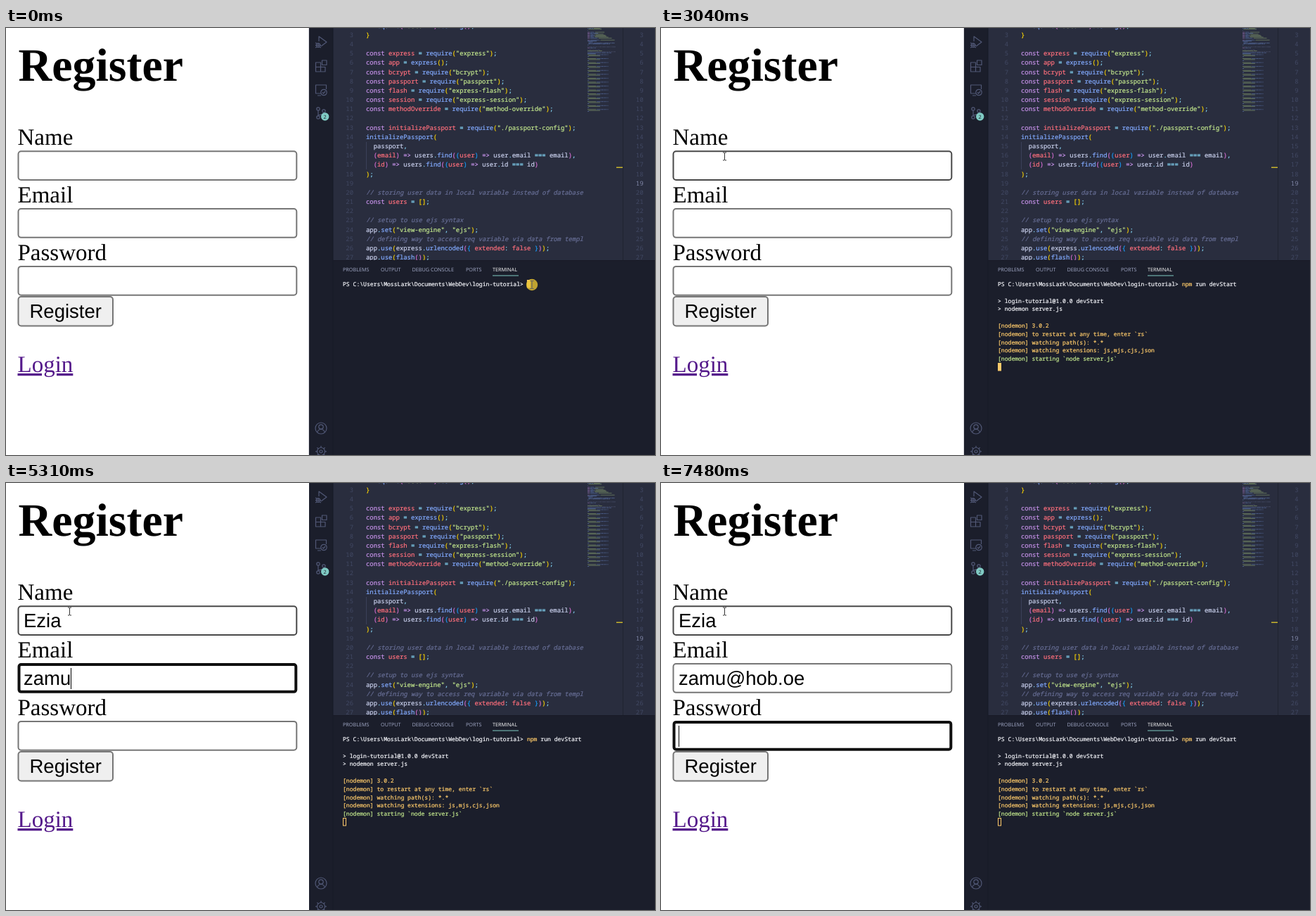
Write an HTML page that moves like this. It is 923 by 607 pixels and loops after 8 s.

```html
<!DOCTYPE html>
<html lang="en">
<head>
<meta charset="utf-8">
<title>Register form</title>
<style>
  html, body { margin: 0; width: 100%; height: 100%; overflow: hidden; background: #fff; }
  svg { display: block; width: 923px; height: 607px; }
  text { text-rendering: geometricPrecision; }
  tspan { stroke-width: .22px; }
  .serif { font: 33px "Liberation Serif", serif; }
  .link { fill: #551a8b; text-decoration: underline; }
  .title { font: bold 66px "Liberation Serif", serif; }
  .sans { font: 27.5px "Liberation Sans", sans-serif; }
  .code { font: 8.9px "Noto Sans Mono", monospace; }
  .term { font: 8.08px "Noto Sans Mono", monospace; }
  .tab { font: 7.25px "Open Sans", sans-serif; fill: #a3aac8; }
  .icon { fill: none; stroke: #515876; stroke-width: 1.2; stroke-linejoin: round; }
</style>
</head>
<body>
<svg id="stage" viewBox="0 0 923 607" xmlns="http://www.w3.org/2000/svg"></svg>
<script>
const LOOP = 8000;
const stage = document.getElementById('stage');

const rect = (x, y, w, h, fill, more = '') =>
  `<rect x="${x}" y="${y}" width="${w}" height="${h}" fill="${fill}" ${more}/>`;
const text = (x, y, cls, body, more = '') =>
  `<text x="${x}" y="${y}" class="${cls}" ${more}>${body}</text>`;
const span = (ink, body, more = '') =>
  `<tspan fill="${ink}" stroke="${ink}" ${more}>${body.replace(/ /g, '\u00a0')}</tspan>`;

// ---- Register page ----
const FIELDS = [['Name', 174.2], ['Email', 256.05], ['Password', 337.9]];

function page() {
  const fields = FIELDS.map(([label, y], i) =>
    text(16.5, y - 8.2, 'serif', label) +
    `<rect id="box${i}" fill="#fff"/>` +
    text(25, y + 30.8, 'sans', '', `id="value${i}"`)).join('');
  return rect(0, 0, 431, 607, '#fff') +
    text(17.5, 75.2, 'title', 'Register') + fields +
    rect(17.5, 382, 134.5, 41.5, '#efefef', 'stroke="#767676" stroke-width="2" rx="4"') +
    text(33.5, 412.3, 'sans', 'Register') +
    text(16.5, 489, 'serif link', 'Login') +
    rect(0, 0, 1, 30, '#000', 'id="caret"') +
    rect(430, 0, 1, 607, '#dcdde2', 'id="edge"');
}

// ---- Editor ----
const CODE = [
  '  require("dotenv").config();', '}', '',
  'const express = require("express");',
  'const app = express();',
  'const bcrypt = require("bcrypt");',
  'const passport = require("passport");',
  'const flash = require("express-flash");',
  'const session = require("express-session");',
  'const methodOverride = require("method-override");', '',
  'const initializePassport = require("./passport-config");',
  'initializePassport(',
  '  passport,',
  '  (email) => users.find((user) => user.email === email),',
  '  (id) => users.find((user) => user.id === id)',
  ');', '',
  '// storing user data in local variable instead of database',
  'const users = [];', '',
  '// setup to use ejs syntax',
  'app.set("view-engine", "ejs");',
  '// defining way to access req variable via data from templ',
  'app.use(express.urlencoded({ extended: false }));',
  'app.use(flash());'
];
const INK = { plain: '#c8cfec', word: '#c792ea', name: '#ff6f7c', call: '#82aaff',
  string: '#c3e88d', punct: '#89ddff', note: '#676e95' };
const BRACKETS = ['#ffd700', '#da70d6', '#179fff'];
const lineY = n => 39.2 + (n - 5) * 13.18;
let depth = 1;

function tokenColor(token, before, after) {
  if (token[0] === '"') return INK.string;
  if (/^[([{]$/.test(token)) return BRACKETS[depth++ % 3];
  if (/^[)\]}]$/.test(token)) return BRACKETS[--depth % 3];
  if (token === 'const' || token === '=>') return INK.word;
  if (token === 'false') return INK.name;
  if (!/^\w/.test(token)) return INK.punct;
  if (after[0] === '(') return INK.call;
  if (/const $/.test(before) || /^(\) =>|:)/.test(after)) return INK.name;
  return INK.plain;
}

function highlight(line) {
  if (line.startsWith('//')) return span(INK.note, line, 'font-style="italic"');
  return line.replace(/"[^"]*"|\w+|=>|=+|\s+|\S/g, (token, at) =>
    span(tokenColor(token, line.slice(0, at), line.slice(at + token.length)), token));
}

// The overview repeats the code at a small scale, followed by similar blocks.
function minimap() {
  const block = ['app.post("/login", isGuest, (req, res) => {', '  res.render("login.ejs");', '});', ''];
  const lines = ['if (mode !== "production") {', ...CODE];
  while (lines.length < 85) lines.push(...block);
  const pitch = 1.39, charWidth = 0.69;
  return lines.map((line, row) => [...line.matchAll(/\S+/g)].map(({ 0: word, index }) => {
    const ink = line.startsWith('//') ? INK.note : word.includes('"') ? INK.string
      : word === 'const' ? INK.word : INK.call;
    return rect(827 + index * charWidth, row * pitch, word.length * charWidth, 0.9, ink, 'opacity=".4"');
  }).join('')).join('');
}

function editor() {
  const numbers = (x, active) => CODE.map((_, i) => text(x, lineY(i + 2), 'code', `${i + 2}`,
    `text-anchor="end" fill="${i + 2 === active ? '#7f86a6' : '#414863'}"`)).join('');
  const lines = CODE.map((line, i) => text(512, lineY(i + 2), 'code', highlight(line))).join('');
  return `<svg x="465" width="458" height="330" viewBox="465 0 458 330">` +
    rect(465, 0, 458, 330, '#292d3e') + numbers(494, 0) + numbers(906.5, 19) +
    rect(512, 162, 1, 39, '#3a4059') + lines + minimap() +
    rect(877, 0, 1, 330, '#202330') + rect(868, 197.5, 9, 1.5, '#c9b52c') + '</svg>';
}

// ---- Activity bar ----
function activityBar() {
  const icon = (y, body) => `<g class="icon" transform="translate(448 ${y})">${body}</g>`;
  const ring = (x, y, r) => `<circle cx="${x}" cy="${y}" r="${r}"/>`;
  const path = d => `<path d="${d}"/>`;
  const teeth = Array.from({ length: 8 }, (_, i) =>
    `<path d="M0-5.5V-8" transform="rotate(${i * 45})"/>`).join('');
  return rect(431, 0, 34, 607, '#1b1e2b') +
    icon(20, path('M-3-1V-8L8 0 0 6') + ring(-4, 4.5, 2.8) +
      path('M-8 1l2 1M-8 4.5h8M-8 8l2-1M0 8l-2-1M-4 2v5')) +
    icon(54, path('M-7.5-5H-.5V8H-7.5ZM-7.5 1.5H6V8H-.5M1.5-8H8V-1.5H1.5Z')) +
    icon(88, path('M0 5H-7.5V-7H7.5V-1M-5 8H0') + ring(4, 3.5, 4.2) + path('M2 3.5l1.5 1.5 2.5-3')) +
    icon(121, ring(-4, -6, 2.2) + ring(-4, 6, 2.2) + ring(4, -3, 2.2) + path('M-4-4V4M4-1Q4 2-4 3')) +
    `<circle cx="453.7" cy="126" r="5.7" fill="#80cbc4"/>` +
    text(453.7, 128.5, 'tab', '2', 'text-anchor="middle" style="fill:#1b1e2b"') +
    icon(569, ring(0, 0, 8) + ring(0, -2, 3.2) + path('M-5.5 6Q-4 1.5 0 1.5T5.5 6')) +
    icon(602, ring(0, 0, 5.5) + ring(0, 0, 2) + teeth);
}

// ---- Terminal ----
const YELLOW = '#ffcb6b', GREEN = '#c3e88d', WHITE = '#f4f5fa';
const CELL = 4.85;
const termY = row => 367 + row * 11.8;
const OUTPUT = [
  [2, WHITE, '> login-tutorial@1.0.0 devStart', 'npm'],
  [3, WHITE, '> nodemon server.js', 'npm'],
  [5, YELLOW, '[nodemon] 3.0.2', 'mon'],
  [6, YELLOW, '[nodemon] to restart at any time, enter `rs`', 'mon'],
  [7, YELLOW, '[nodemon] watching path(s): *.*', 'mon'],
  [8, YELLOW, '[nodemon] watching extensions: js,mjs,cjs,json', 'mon'],
  [9, GREEN, '[nodemon] starting `node server.js`', 'mon']
];

function terminal() {
  const tabs = [['PROBLEMS', 479], ['OUTPUT', 533], ['DEBUG CONSOLE', 577.5], ['PORTS', 654]]
    .map(([name, x]) => text(x, 346.3, 'tab', name)).join('');
  const group = id => `<g id="${id}">` + OUTPUT.filter(line => line[3] === id)
    .map(([row, ink, body]) => text(479, termY(row), 'term', span(ink, body))).join('') + '</g>';
  return rect(465, 330, 458, 277, '#1b1e2b') + rect(464.5, 0, 1, 607, '#171a26') +
    rect(465, 330, 458, 1, '#181a26') + tabs +
    text(692, 346.3, 'tab', 'TERMINAL', 'style="fill:#fff"') + rect(692, 351.5, 37, 1, '#80cbc4') +
    text(479, termY(0), 'term', span(WHITE, 'PS C:\\Users\\MossLark\\Documents\\WebDev\\login-tutorial>')) +
    text(479 + 54 * CELL, termY(0), 'term', span(YELLOW, 'npm') + span(WHITE, ' run devStart'), 'id="command"') +
    group('npm') + group('mon') + '<rect id="block"/>';
}

function pointer() {
  return `<g id="mouse"><circle id="halo" r="8.2" fill="#e8c433" opacity=".8"/>
    <path id="beam" fill="none" d="M-2.5-5.5H-.5L0-5 .5-5.5H2.5M0-5V5M-2.5 5.5H-.5L0 5 .5 5.5H2.5"/>
    <path id="arrow" d="M0 0V11L2.6 8.6 4.3 12.4 6 11.6 4.4 8H8Z" fill="#fff" stroke="#000" stroke-width=".8"/></g>`;
}

stage.innerHTML = page() + activityBar() + editor() + terminal() + pointer();
const el = {};
stage.querySelectorAll('[id]').forEach(node => el[node.id] = node);
const set = (node, attrs) => Object.entries(attrs).forEach(([k, v]) => node.setAttribute(k, v));
const show = (node, on) => node.setAttribute('visibility', on ? 'visible' : 'hidden');

// ---- Timeline: [time, state...] ----
const TYPED = [
  [[0, ''], [3980, 'E'], [4160, 'Ez'], [4270, 'Ezi'], [4410, 'Ezia']],
  [[0, ''], [4980, 'z'], [5050, 'za'], [5230, 'zam'], [5310, 'zamu'], [5660, 'zamu@'],
   [5910, 'zamu@h'], [6040, 'zamu@ho'], [6360, 'zamu@h'], [6460, 'zamu@'], [6560, 'zamu@h'],
   [6700, 'zamu@ho'], [6850, 'zamu@hob'], [6970, 'zamu@hob.'], [7100, 'zamu@hob.o'], [7230, 'zamu@hob.oe']],
  [[0, '']]
];
const FOCUS = [[0, -1], [3170, 0], [4660, 1], [7480, 2]];
const BLOCK = [[0, 54, 0], [940, 70, 0], [1710, 0, 1], [2270, 0, 5], [2560, 0, 10]];
const PATH = [[2330, 748, 365], [2520, 560, 300], [2700, 280, 205], [2850, 120, 150], [3040, 90.5, 182.5]];

const current = (steps, t) => steps.filter(step => step[0] <= t).pop();

function mouseAt(t) {
  const time = t >= 3040 ? 3040 : Math.floor(t / 64) * 64;
  const i = PATH.findIndex(point => point[0] > time);
  if (i === 0) return PATH[0].slice(1);
  if (i < 0) return PATH[PATH.length - 1].slice(1);
  const [a, b] = [PATH[i - 1], PATH[i]];
  const k = (time - a[0]) / (b[0] - a[0]);
  return [1, 2].map(n => a[n] + (b[n] - a[n]) * k);
}

// Borders grow inwards, so every state keeps the same outer edge.
function drawBox(node, y, weight, stroke) {
  set(node, { x: 16.5 + weight / 2, y: y + weight / 2, width: 397.8 - weight, height: 42.8 - weight,
    rx: 5 - weight / 2, stroke, 'stroke-width': weight });
}

function render(t) {
  const [mx, my] = mouseAt(t);
  const focus = current(FOCUS, t)[1];
  const inName = mx > 17 && mx < 414 && my > 174 && my < 217;

  FIELDS.forEach(([, y], i) => {
    if (i === focus) drawBox(el['box' + i], y, 4, '#101010');
    else drawBox(el['box' + i], y, 2, i === 0 && inName ? '#484848' : '#767676');
    el['value' + i].textContent = current(TYPED[i], t)[1];
  });

  show(el.caret, focus >= 0 && !(t >= 3710 && t < 3980));
  if (focus >= 0) {
    const width = el['value' + focus].getComputedTextLength();
    set(el.caret, { x: Math.round(25 + width), y: Math.round(FIELDS[focus][1] + 6.6) });
  }

  show(el.command, t >= 940);
  show(el.npm, t >= 2270);
  show(el.mon, t >= 2560);
  const [, col, row] = current(BLOCK, t);
  const x = 479 + col * CELL, y = termY(row) - 9;
  set(el.block, t < 3170
    ? { x, y, width: 5, height: 11.5, fill: '#ffcb6b', stroke: 'none' }
    : { x: x + 0.5, y: y + 0.5, width: 4, height: 10.5, fill: 'none', stroke: '#ffcb6b' });
  show(el.edge, t < 3170);

  const clicking = t < 70 || (t >= 3170 && t < 3220);
  const overText = mx > 478 || inName;
  set(el.mouse, { transform: `translate(${mx} ${my})` });
  show(el.halo, clicking);
  show(el.beam, overText);
  show(el.arrow, !overText);
  el.beam.setAttribute('stroke', clicking ? '#555866' : mx > 431 ? '#e4e4e4' : '#333');
}

function frame() {
  render(performance.now() % LOOP);
  requestAnimationFrame(frame);
}
frame();
</script>
</body>
</html>
```
